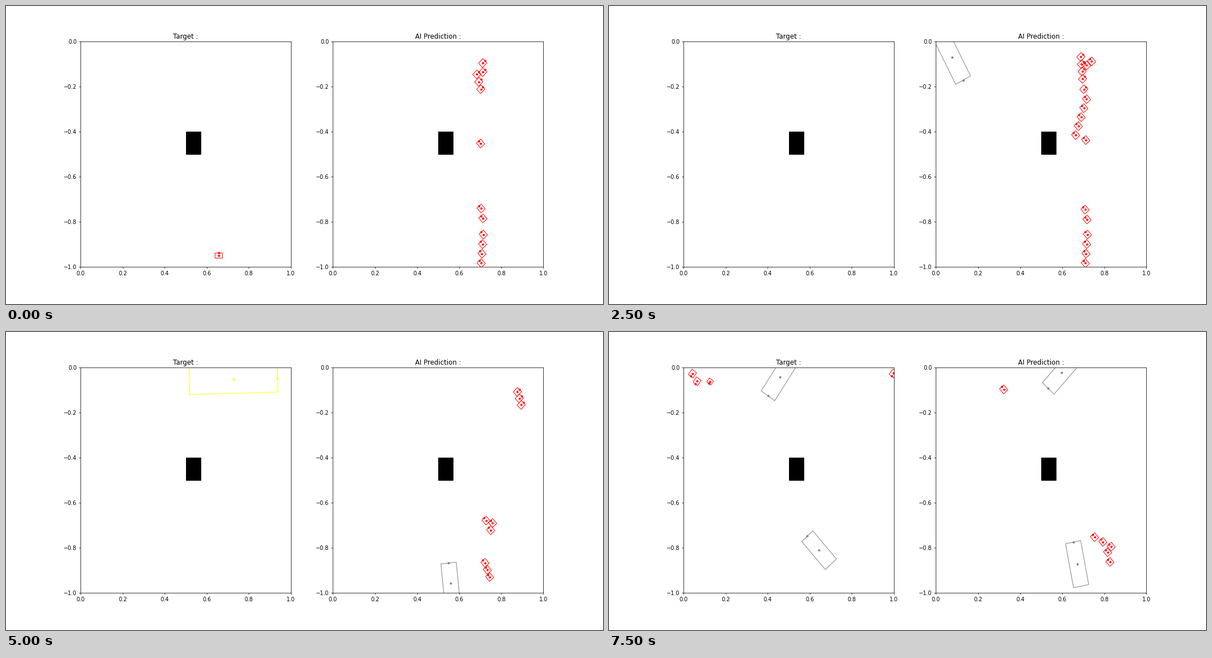
These frames come from a looping animation (1058 by 529 pixels, 8000 ms). A matplotlib script:

```python
import numpy as np
import matplotlib.pyplot as plt
from matplotlib.animation import FuncAnimation
from matplotlib.patches import Polygon, Rectangle

STEPS, STEP_MS = 16, 500
DPI = 1058 / 15 + 1e-6

plt.rcParams["font.family"] = "DejaVu Sans"
fig, (truth, guess) = plt.subplots(
    1, 2, figsize=(15, 7.5), dpi=DPI, facecolor="white",
    gridspec_kw=dict(left=0.125, right=0.9, bottom=0.125, top=0.88, wspace=0.2))

for ax, title in ((truth, "Target :"), (guess, "AI Prediction :")):
    ax.set(xlim=(0, 1), ylim=(-1, 0), title=title,
           xticks=np.linspace(0, 1, 6), yticks=np.linspace(-1, 0, 6))
    ax.add_patch(Rectangle((0.5, -0.5), 0.07, 0.1, color="black", lw=1))

NE, NW, SW = 45, 131, -127
PERSON = (0.029, 0.027)
agents = []


class Agent:
    """Oriented box with a dot at its centre and one at its front edge."""

    def __init__(self, ax, color, keys, width, span=None):
        # each key: step, x, y, heading, length
        self.keys = np.array(keys, float).T
        self.width = width
        self.first, self.last = span or (keys[0][0], keys[-1][0])
        self.body = ax.add_patch(
            Polygon(np.zeros((4, 2)), fill=False, ec=color, lw=1, zorder=2))
        self.dots, = ax.plot([], [], ".", color=color, ms=6, zorder=2)
        agents.append(self)

    def update(self, step):
        shown = self.first <= step <= self.last
        self.body.set_visible(shown)
        self.dots.set_visible(shown)
        if not shown:
            return
        t, *columns = self.keys
        x, y, heading, length = (np.interp(step, t, c) for c in columns)
        a = np.radians(heading)
        mid = np.array([x, y])
        front = np.array([np.cos(a), np.sin(a)]) * length / 2
        side = np.array([-np.sin(a), np.cos(a)]) * self.width / 2
        self.body.set_xy([mid + front + side, mid + front - side,
                          mid - front - side, mid - front + side])
        self.dots.set_data(*zip(mid, mid + front))


def vehicle(ax, color, *keys):
    """Longer vehicles are wider too."""
    Agent(ax, color, keys, 0.036 + 0.207 * keys[0][-1])


def row(first, last, heading, start, end=None, n=1, drift=(0, 0),
        ax=guess, color="red", size=PERSON):
    """People spaced evenly from start to end, drifting a little each step."""
    length, width = size
    shift = np.array(drift) * (last - first)
    for p in np.linspace(start, end or start, n):
        Agent(ax, color, [(first, *p, heading, length),
                          (last, *(p + shift), heading, length)], width)


# left panel
row(0, 0, 90, (0.656, -0.949), ax=truth, size=(0.024, 0.034))
vehicle(truth, "yellow", (9, 0.684, -0.0475, -7.3, 0.42), (13, 0.856, -0.0655, 27.6, 0.42))
vehicle(truth, "gray", (11, 0.572, -0.983, 95.7, 0.168), (15, 0.644, -0.811, 132, 0.168))
vehicle(truth, "gray", (14, 0.51, 0.03, -123.9, 0.202), (15, 0.4575, -0.041, -123.9, 0.202))
row(14, 15, SW, (0.042, -0.026), (0.064, -0.06), 2, ax=truth)
row(14, 15, SW, (0.126, -0.061), ax=truth, size=(0.022, 0.024))
row(14, 15, SW, (0.997, -0.025), ax=truth)

# right panel, vehicles
vehicle(guess, "gray", (2, 0.017, -0.3575, -119.7, 0.213),
        (4, 0.026, -0.116, -68.4, 0.248), (6, 0.125, -0.022, -56, 0.211))
vehicle(guess, "aquamarine", (4, 0.0314, -0.182, -70.2, 0.293))
vehicle(guess, "gray", (7, 0.023, -0.167, -70, 0.22))
vehicle(guess, "gray", (7, 0.511, -1.006, 86, 0.181), (10, 0.559, -0.958, 96, 0.181),
        (12, 0.591, -0.926, 102.7, 0.182), (15, 0.671, -0.873, 101, 0.199))
vehicle(guess, "gray", (14, 0.662, 0.048, -132.6, 0.19), (15, 0.598, -0.022, -132.6, 0.19))

# right panel, knot of people near the left edge
row(4, 4, -133, (0.146, -0.472), (0.131, -0.49), 2, size=(0.05, 0.0285))
row(4, 4, -133, (0.127, -0.5), color="black", size=(0.053, 0.0285))
row(4, 4, -133, (0.1415, -0.518), color="blue", size=(0.055, 0.0285))

# right panel, three people waiting at the top, then crossing to the right
for i in range(3):
    path = [(0, 0.712, -0.055 - 0.04 * i), (2, 0.712, -0.056 - 0.037 * i),
            (4, 0.671 + 0.014 * i, -0.07 - 0.03 * i),
            (6, 0.707 - 0.008 * i, -0.065 - 0.034 * i),
            (8, 0.75, -0.085 - 0.032 * i),
            (10, 0.877 + 0.009 * i, -0.107 - 0.029 * i),
            (12, 0.893, -0.19 - 0.029 * i), (13, 0.9, -0.225 - 0.029 * i)]
    Agent(guess, "red", [(*p, NE, PERSON[0]) for p in path], PERSON[1],
          span=(0 if i else 3, 13 if i == 2 else 11))

# right panel, people standing in rows
row(0, 1, NE, (0.684, -0.145), (0.703, -0.211), 3)
row(3, 4, NE, (0.638, -0.06), (0.66, -0.023), 2)
row(3, 5, NE, (0.697, -0.165), (0.703, -0.211), 2)
row(0, 5, NW, (0.702, -0.452), drift=(0.002, 0.003))
row(5, 7, NW, (0.74, -0.087), (0.716, -0.105), 2)
row(5, 8, NW, (0.716, -0.255), (0.664, -0.415), 5)

row(0, 5, NW, (0.704, -0.741), (0.713, -0.785), 2, drift=(0.001, -0.001))
row(0, 5, NW, (0.715, -0.857), (0.705, -0.984), 4, drift=(0.001, 0))
row(6, 7, NW, (0.703, -0.76))

row(8, 11, NW, (0.728, -0.679), (0.759, -0.69), 2)
row(8, 11, NW, (0.75, -0.722))
row(7, 11, NW, (0.723, -0.867), (0.745, -0.93), 3)
row(11, 13, NW, (0.713, -0.803), (0.72, -0.933), 4)
row(14, 15, NW, (0.754, -0.753), (0.833, -0.795), 3)
row(14, 15, NW, (0.816, -0.82), (0.827, -0.863), 2)
row(14, 15, NW, (0.322, -0.096))


def draw(step):
    for agent in agents:
        agent.update(step)
    return []


anim = FuncAnimation(fig, draw, frames=STEPS, interval=STEP_MS,
                     init_func=lambda: draw(0), repeat=True, repeat_delay=0)
plt.show()
```
